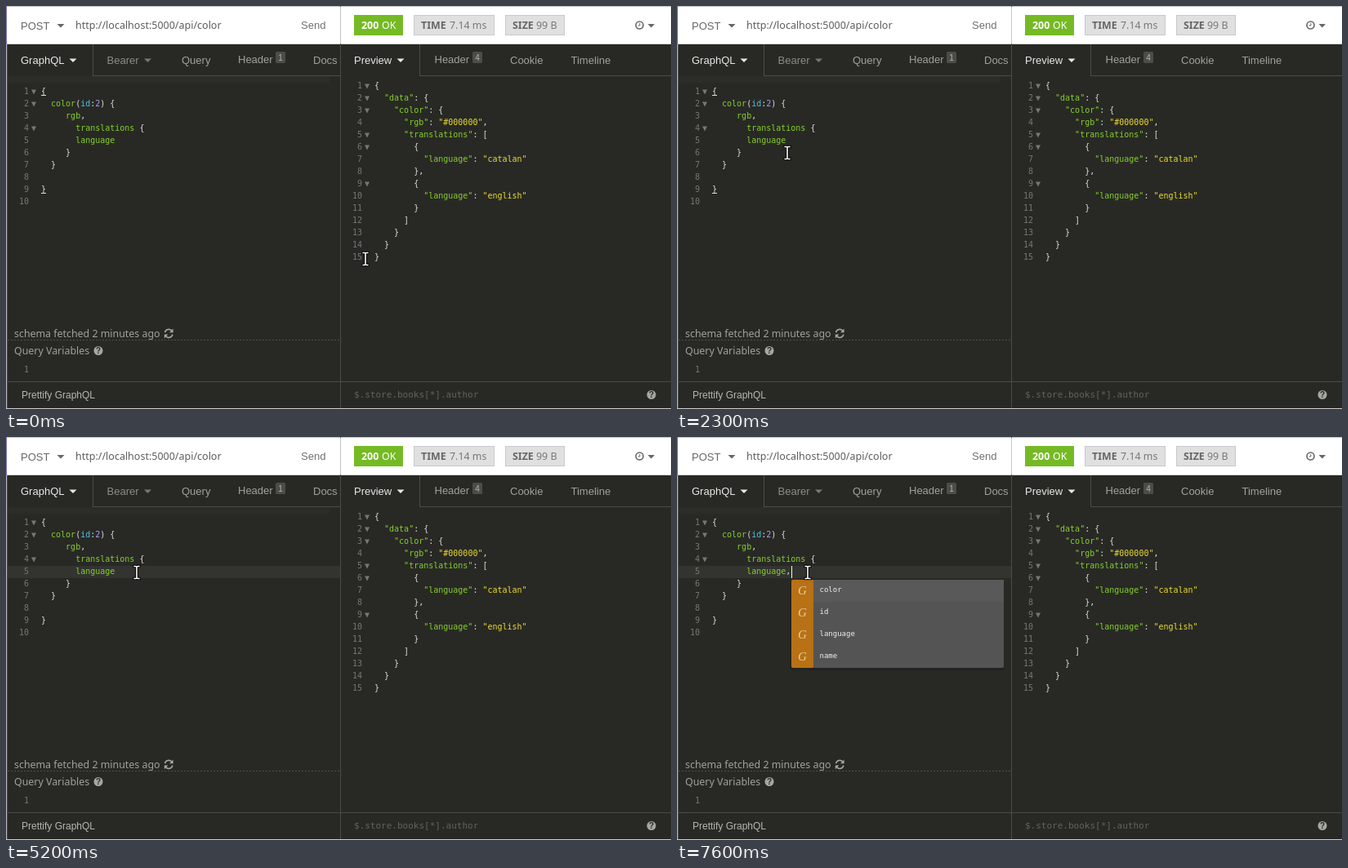
An HTML page for the animation above (8 s loop, 814 by 494 pixels).

```html
<!DOCTYPE html>
<html lang="en">
<head>
<meta charset="utf-8">
<title>GraphQL client</title>
<style>
  html, body { margin: 0; width: 100%; height: 100%; overflow: hidden; background: #282925; }
  svg { display: block; width: 814px; height: 494px; }
  text { white-space: pre; }
  .btn { font: 13px "Liberation Sans", Arial, sans-serif; }
  .ui { font: 12.4px "Noto Sans", "Open Sans", sans-serif; }
  .bold { font-weight: 700; }
  .code { font: 10px "DejaVu Sans Mono", monospace; }
  .icon { font: italic 15px "Liberation Serif", serif; }
</style>
</head>
<body>
<svg id="stage" viewBox="0 0 814 494" xmlns="http://www.w3.org/2000/svg"></svg>
<script>
const NS = "http://www.w3.org/2000/svg";
const stage = document.getElementById("stage");
const LOOP = 8000, STEP = 100, PITCH = 6.02, ROW = 15;
const GREEN = "#86d02c", YELLOW = "#ebdc2e", CYAN = "#4fc3e8", PURPLE = "#ab97f5";
const PLAIN = "#dededb", DIM = "#777872", EDGE = "#4b4c48", TAB = "#a0a19d";

function add(tag, attrs, parent = stage) {
  const el = document.createElementNS(NS, tag);
  for (const key in attrs) el.setAttribute(key, attrs[key]);
  parent.appendChild(el);
  return el;
}

const rect = (x, y, width, height, fill, more, parent) =>
  add("rect", { x, y, width, height, fill, ...more }, parent);

function text(x, y, str, fill, cls, more, parent) {
  const el = add("text", { x, y, fill, class: cls, ...more }, parent);
  el.textContent = str;
  return el;
}

const down = (x, y, w, h, fill) =>
  add("path", { d: `M${x} ${y}h${w}l${-w / 2} ${h}z`, fill });

const show = (el, on) => el.setAttribute("visibility", on ? "visible" : "hidden");

function help(x, y) {
  add("circle", { cx: x, cy: y, r: 5.5, fill: "#a6a7a3" });
  text(x, y + 3.6, "?", "#282925", "btn bold", { "text-anchor": "middle", style: "font-size:10px" });
}

// Colours each token of a line: strings, words, arguments and numbers.
function tokens(str, isJson) {
  const parts = str.match(/"[^"]*"|\w+|[^\w"]+/g) || [];
  return parts.map((part, i) => {
    let fill = PLAIN;
    if (part[0] === '"') fill = (parts[i + 1] || "")[0] === ":" ? GREEN : YELLOW;
    else if (/^\d/.test(part)) fill = PURPLE;
    else if (/^\w/.test(part)) fill = !isJson && part === "id" ? CYAN : GREEN;
    return [part, fill];
  });
}

function editor(lines, x, base, folds, isJson) {
  lines.forEach((str, i) => {
    const y = base + i * ROW;
    text(x - 15, y, i + 1, DIM, "code", { "text-anchor": "end" });
    if (folds.includes(i + 1)) down(x - 12, y - 5.5, 6, 6, "#777872");
    const indent = str.search(/\S/);
    if (indent < 0) return;
    const line = text(x + indent * PITCH, y, "", PLAIN, "code");
    for (const [part, fill] of tokens(str.trim(), isJson))
      add("tspan", { fill }, line).textContent = part;
  });
}

function header() {
  rect(0, 0, 814, 47, "#fff");
  rect(0, 0, 814, 1, "#c4c4c4");
  rect(0, 46, 814, 1, "#d4d4d2");
  text(18, 28.5, "POST", "#666", "btn");
  down(62.5, 22, 9, 4.5, "#666");
  text(85, 28, "http://localhost:5000/api/color", "#5c5c5c", "ui", { style: "font-size:12.5px" });
  text(361, 28, "Send", "#707070", "btn");
  rect(426, 11, 60, 25, "#75ba24");
  text(435, 28, "200", "#fff", "ui bold");
  text(460, 28, "OK", "#fff", "ui");
  badge(499, 99, "TIME", 543, "7.14 ms");
  badge(611, 73, "SIZE", 649, "99 B");
  add("circle", { cx: 775.5, cy: 23.5, r: 4.5, fill: "none", stroke: "#666", "stroke-width": 1.6 });
  add("path", { d: "M775.8 21v3h-2.3", fill: "none", stroke: "#666" });
  down(785.5, 22, 8.5, 4.5, "#666");
}

function badge(x, w, label, valueX, value) {
  rect(x + .5, 11.5, w - 1, 24, "#e0e0e0", { stroke: "#c9c9c9" });
  text(x + 9, 28, label, "#666", "ui bold");
  text(valueX, 28, value, "#777", "ui");
}

function count(x, n) {
  rect(x, 56, 12, 14, "#4c4d49", { rx: 1.5 });
  text(x + 6, 66.5, n, "#b4b5b1", "btn", { "text-anchor": "middle", style: "font-size:10px" });
}

function tabs() {
  const labels = [
    [18, 71, "GraphQL", "#e8e8e6"], [123.5, 71, "Bearer", "#8b8c88"], [215, 71, "Query"],
    [284, 70, "Header"], [376, 71, "Docs"], [426, 71, "Preview", "#e8e8e6"],
    [524.5, 70, "Header"], [617, 71, "Cookie"], [691.5, 71, "Timeline"]
  ];
  for (const [x, y, name, fill = TAB] of labels) text(x, y, name, fill, "btn");
  down(77.5, 64.5, 9, 4.5, "#e8e8e6");
  down(169, 64.5, 9, 4.5, "#777873");
  down(478.5, 64.5, 9, 4.5, "#e8e8e6");
  count(330, 1);
  count(571, 4);
  for (const [x, end] of [[106, 409], [506, 814]]) {
    rect(x, 47, 1, 39, EDGE);
    rect(x, 85, end - x, 1, EDGE);
  }
  rect(2, 86, 394, 8, "#2c2d28");
}

function footer() {
  text(10, 406, "schema fetched 2 minutes ago", "#a0a19d", "ui");
  add("path", {
    d: "M194.6 400.2a4.7 4.7 0 0 1 8.2-2.2M203.8 402.6a4.7 4.7 0 0 1-8.2 2.2",
    fill: "none", stroke: "#a6a7a3", "stroke-width": 1.7
  });
  add("path", { d: "M204.6 395.6v4.6h-4.6zM193.8 407.2v-4.6h4.6z", fill: "#a6a7a3" });
  add("path", { d: "M2 409.5H409", stroke: "#50514d", "stroke-dasharray": "2 2" });
  text(10, 427, "Query Variables", "#a0a19d", "ui");
  help(113, 422.5);
  text(28, 449, "1", DIM, "code", { "text-anchor": "end" });
  rect(0, 460, 814, 1, EDGE);
  text(19, 481, "Prettify GraphQL", "#b5b6b2", "btn", { style: "font-size:12px" });
  text(426, 480, "$.store.books[*].author", "#62635f", "code", { style: "font-size:11px" });
  help(790, 476.5);
  rect(0, 493, 814, 1, "#cfcccf");
}

function completion() {
  const group = add("g", {});
  rect(138, 176, 262, 110, "#000", { rx: 3, opacity: .15 }, group);
  rect(140, 175, 260, 108, "#545454", { rx: 2 }, group);
  rect(167, 175, 233, 27, "#595959", {}, group);
  rect(140, 175, 27, 108, "#b87114", { rx: 2 }, group);
  ["color", "id", "language", "name"].forEach((name, i) => {
    const y = 190 + 27 * i;
    text(153.5, y + 3, "G", "#e3cda8", "icon", { "text-anchor": "middle" }, group);
    text(174.5, y, name, "#efefef", "code", { style: "font-size:9px" }, group);
  });
  return group;
}

function pointer() {
  const group = add("g", {});
  const d = "M-2.8-7.5H-1.2Q0-7.5 0-6.3Q0-7.5 1.2-7.5H2.8M0-6.5V6.5M-2.8 7.5H-1.2Q0 7.5 0 6.3Q0 7.5 1.2 7.5H2.8";
  for (const [stroke, width] of [["#000", 3.6], ["#fff", 1.6]])
    add("path", { d, fill: "none", stroke, "stroke-width": width, "stroke-linecap": "square" }, group);
  return group;
}

rect(0, 0, 814, 494, "#282925");
const active = rect(2, 0, 407, ROW, "#33342f");
header();
tabs();
editor(["{", "  color(id:2) {", "     rgb,", "       translations {", "       language",
  "     }", "  }", "", "}", ""], 43, 108, [1, 2, 4], false);
editor(["{", '  "data": {', '    "color": {', '      "rgb": "#000000",', '      "translations": [',
  "        {", '          "language": "catalan"', "        },", "        {",
  '          "language": "english"', "        }", "      ]", "    }", "  }", "}"],
  451, 101, [1, 2, 3, 5, 6, 9], true);
footer();
rect(409, 0, 1, 493, EDGE);
rect(409, 1, 1, 45, "#c4c4c4");
rect(0, 0, 1, 47, "#7467b8");
rect(0, 47, 1, 446, "#b9b6c4");
rect(1, 47, 1, 446, "#4b4c48");

const comma = text(43 + 15 * PITCH, 168, ",", PLAIN, "code");
const outer = add("path", { d: "M43 109.5h6M43 229.5h6", stroke: PLAIN });
const inner = add("g", {});
add("path", { d: "M55 199.5h6", stroke: PLAIN }, inner);
add("path", { d: "M127.5 124.5h6", stroke: YELLOW }, inner);
text(43 + 14 * PITCH, 123, "{", "#e6d95c", "code", {}, inner);
const caret = rect(0, 0, 1, ROW, "#f2f2ef");
const popup = completion();
const mouse = pointer();

// Pointer stops as time, x, y.
const path = [
  [0, 440, 310], [400, 440, 310], [600, 418, 303], [1100, 254, 251], [1300, 221, 240],
  [1400, 221, 239], [1600, 221, 239], [1700, 213, 230], [1800, 190, 207], [2000, 140, 172],
  [2100, 140, 172], [2700, 126, 195], [3000, 126, 195], [3100, 125, 196], [3400, 125, 196],
  [3800, 138, 180], [4200, 157, 168], [4400, 157, 168], [4600, 160, 166], [LOOP, 160, 166]
];
// Caret changes as time, x (0 is hidden).
const blinks = [
  [0, 0], [3400, 61], [4000, 0], [4500, 61], [4700, 134], [5200, 0],
  [5800, 134], [6200, 140], [7000, 0], [7600, 140]
];

function pointerAt(t) {
  const i = path.findIndex(stop => stop[0] > t);
  const [t0, x0, y0] = path[i - 1], [t1, x1, y1] = path[i];
  const k = (t - t0) / (t1 - t0);
  return [Math.round(x0 + (x1 - x0) * k), Math.round(y0 + (y1 - y0) * k)];
}

function draw(now) {
  const t = Math.floor((now % LOOP) / STEP) * STEP;
  const row = t < 3400 ? 0 : t < 4700 ? 7 : 5;
  const top = 98 + (row - 1) * ROW;
  show(active, row > 0);
  active.setAttribute("y", top);
  show(outer, row === 0);
  show(inner, row === 7);
  const x = blinks.filter(b => b[0] <= t).pop()[1];
  show(caret, x > 0);
  caret.setAttribute("x", x);
  caret.setAttribute("y", top);
  show(comma, t >= 6200);
  show(popup, t >= 7400);
  mouse.setAttribute("transform", `translate(${pointerAt(t)})`);
}

const start = performance.now();
function tick() {
  draw(performance.now() - start);
  requestAnimationFrame(tick);
}
tick();
</script>
</body>
</html>
```
